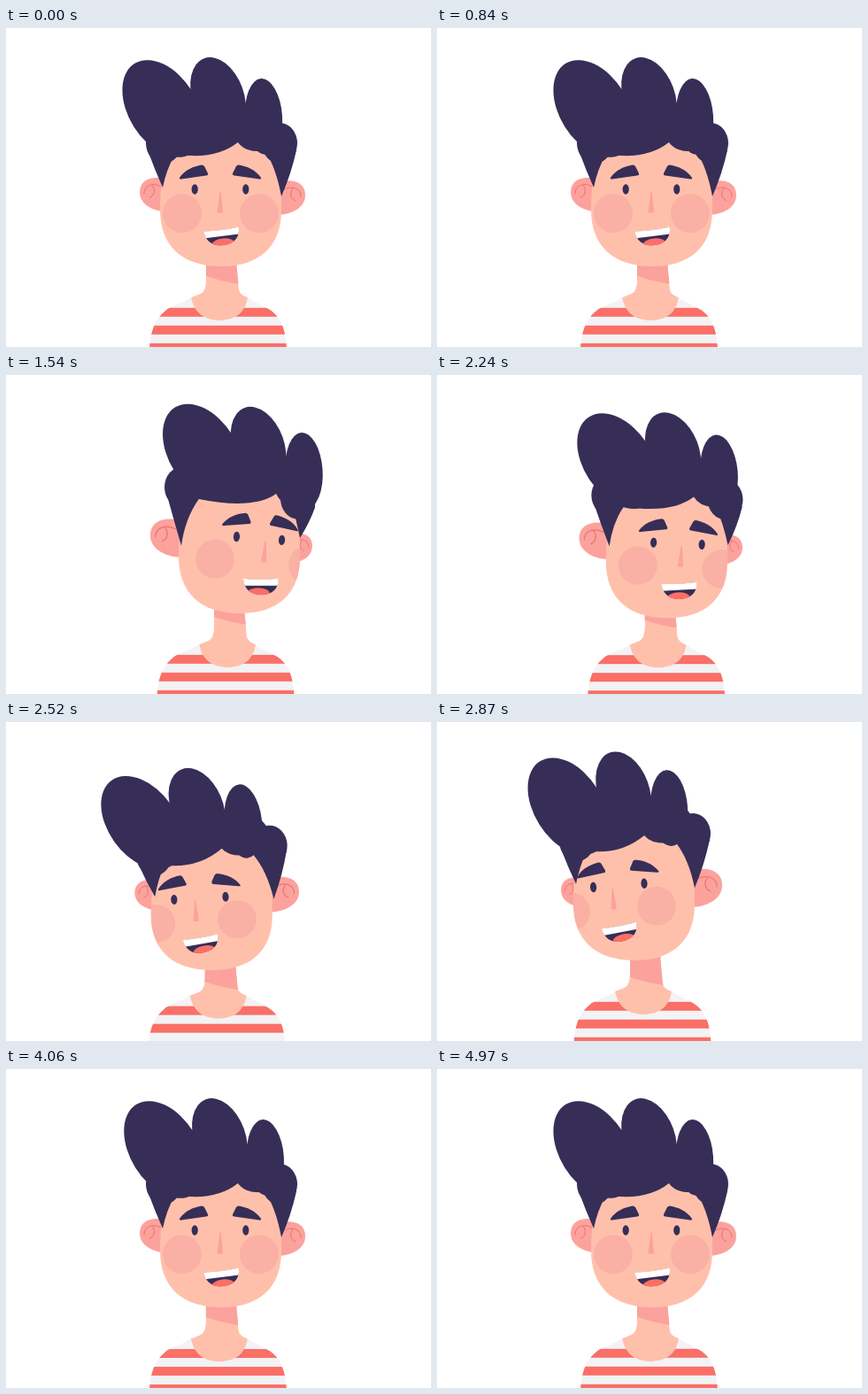
An HTML page with a canvas that plays this animation: 480x360 px, repeating every 5.04 s.

```html
<!DOCTYPE html>
<html lang="en">
<head>
<meta charset="utf-8">
<title>Boy looking around</title>
<style>
  html, body { margin: 0; width: 100%; height: 100%; overflow: hidden; background: #fff; }
  canvas { display: block; width: 480px; height: 360px; }
</style>
</head>
<body>
<canvas id="stage" width="480" height="360"></canvas>
<script>
const ctx = document.getElementById('stage').getContext('2d');
const LOOP = 5040;
const SKIN = '#ffc0ab', PINK = '#fca29d', BLUSH = '#fab0a5', INK = '#362e57',
      RED = '#fa6f67', SHIRT = '#f3f2f4', LINE = '#e8706f';

// Each turn: start, duration, pose before and after (1 right, -1 left), dip strength
const TURNS = [
  { start: 840, dur: 500, from: 0, to: 1, dip: 0.7 },
  { start: 2040, dur: 600, from: 1, to: -1, dip: 1 },
  { start: 3480, dur: 500, from: -1, to: 0, dip: 0.7 }
];
const LAG = { features: 0.04, head: 0.133, body: 0.25 };
const SIDES = [-1, 1];

const clamp = v => Math.max(0, Math.min(1, v));
const ease = u => (1 - Math.cos(Math.PI * u)) / 2;
// Smooth offset: 0 when facing front, reaching the given right and left values
const shift = (k, right, left) => k * (right - left) / 2 + k * k * (right + left) / 2;
const headX = k => shift(k, 21, -20);

function pose(time, lag) {
  let turn = 0, dip = 0, lean = 0;
  for (const s of TURNS) {
    const u = clamp((time - s.start) / s.dur - lag);
    const bump = Math.sin(Math.PI * u) ** 2 * s.dip;
    if (u > 0) turn = s.from + (s.to - s.from) * ease(u);
    dip += bump;
    lean += bump * Math.sign(s.to - s.from);
  }
  return { turn, dip, lean };
}

// Hair swings past its goal and settles
function swing(time) {
  let x = 0;
  for (const s of TURNS) {
    const after = Math.max(0, time - s.start - s.dur) / 200;
    const reach = 3 * Math.sign(s.to - s.from) * ease(clamp((time - s.start) / s.dur));
    x += reach * Math.exp(-after) * Math.cos(after);
  }
  return x;
}

function fill(color, path) {
  ctx.fillStyle = color;
  ctx.fill(typeof path === 'string' ? new Path2D(path) : path);
}

function oval(color, x, y, rx, ry = rx, angle = 0) {
  ctx.fillStyle = color;
  ctx.beginPath();
  ctx.ellipse(x, y, rx, ry, angle * Math.PI / 180, 0, Math.PI * 2);
  ctx.fill();
}

function group(draw) {
  ctx.save();
  draw();
  ctx.restore();
}

function drawShirt(body) {
  group(() => {
    ctx.translate(shift(body.turn, 8.5, -7.5), 5 * body.dip);
    ctx.clip(new Path2D('M209 304 C200 311 186 313 179 320 C167 330 163 345 162 362 V375 H317 V362 C316 345 313 331 302 321 C294 314 282 311 273 304 Z'));
    ctx.fillStyle = SHIRT;
    ctx.fillRect(150, 300, 180, 80);
    ctx.fillStyle = RED;
    for (let y = 315.8; y < 370; y += 20) ctx.fillRect(150, y, 180, 10);
  });
}

function drawNeck(body, head) {
  const neck = new Path2D('M226 235 V270 C226 285 227 297 219 300 L209 304 C212 321 224 330 241 330 C259 330 271 321 273 304 Q264 301 263 295 L260.500 268 V235 Z');
  group(() => {
    ctx.translate(shift(body.turn, 9, -8), 5 * body.dip);
    ctx.clip(neck);
    fill(SKIN, neck);
    ctx.translate(0, shift(head.turn, -7, 8) + 6 * head.dip);
    fill(PINK, 'M215 220 L224 279 Q242 286 264 289 L275 220 Z');
  });
}

function drawEars(head) {
  const k = head.turn;
  for (const side of SIDES) group(() => {
    ctx.translate(244.5 + side * 75.5 + shift(k, 13 - 2 * side, -16.5 - 2.5 * side),
                  190 + side * (1.7 + 4 * k) - 11 * head.dip);
    ctx.scale(side * (1 - side * k * 0.17), 1 - side * k * 0.13);
    fill(PINK, 'M-18 -14 C-8 -22 18 -23 18 -3 C18 11 3 19 -14 19 Z');
    ctx.strokeStyle = LINE;
    ctx.stroke(new Path2D('M13 -1 C13 -12 2 -14 -7 -9 M4 -11 C0 -6 1 1 7 3'));
  });
}

function drawFace(head, k) {
  const face = new Path2D('M174 205 C174 190 175 178 177 165 L190 125 H300 L310 165 C311 180 311 190 311 205 C311 247 286 269 243 269 C199 269 174 246 174 205 Z');
  group(() => {
    ctx.translate(headX(head.turn), 0);
    fill(SKIN, face);
    ctx.clip(face);
    ctx.translate(-headX(k), 3 * head.dip);
    for (const side of SIDES) {
      oval(BLUSH, 242.5 + 43.5 * side + shift(k, 46 + 9 * side, -43 + 5 * side),
           209.2 + 1.7 * k * k + 3.3 * side * k, 22);
    }
  });
}

// Hair near the top and middle slides further than the rim; sideburns tilt the other way
function warp(k, x, y) {
  const near = Math.max(0, 1 - ((x - 245) / 62) ** 2, clamp((120 - y) / 18));
  const drop = clamp((y - 150) / 29);
  const tilt = (1 - drop) * shift(k, 0.1, -0.062) + drop * shift(k, -0.14, -0.04);
  return [x + headX(k) + near * shift(k, 24, -8.5),
          y + shift(k, 3.3, 0) + (x - 245) * tilt];
}

function drawHair(head, k, time) {
  const at = (x, y) => warp(k, x, y);
  const lock = (x, y, rx, ry, angle) => oval(INK, ...at(x, y), rx, ry, angle);
  group(() => {
    ctx.translate(headX(head.turn) - headX(k) + 240, 150);
    ctx.rotate(0.06 * head.lean);
    ctx.translate(-240, -150);

    group(() => {
      ctx.translate(swing(time), 0);
      lock(177, 91, 60, 38.5, 58);
      lock(239.5, 77, 45.5, 29, 70);
      lock(291, 100, 43, 21, 86);
    });
    for (const side of SIDES) lock(243.5 + side * 65.5, 130, 20, 23, 0);

    const cap = new Path2D();
    const curve = (cx, cy, x, y) => cap.quadraticCurveTo(...at(cx, cy), ...at(x, y));
    cap.moveTo(...at(160, 138));
    curve(168, 160, 177, 180);
    curve(181, 160, 191, 142);
    curve(235, 150, 262, 129);
    curve(270, 141, 293, 139);
    curve(305, 158, 311, 190);
    curve(322, 165, 328, 138);
    cap.lineTo(...at(300, 88));
    cap.lineTo(...at(190, 76));
    cap.closePath();
    fill(INK, cap);
  });
}

function drawMouth(k) {
  group(() => {
    ctx.translate(243 + 4.2 * k, 227);
    ctx.rotate(-0.125 + shift(k, 0.05, 0.015));
    const mouth = new Path2D('M-20 0 Q0 2 20 0 C20 12 13 18.500 0 18.500 C-13 18 -19 11 -20 0 Z');
    ctx.clip(mouth);
    fill(INK, mouth);
    oval(RED, -3 * k, 17, 13, 6.5);
    fill('#fff', 'M-22 -2 H22 V8 H-22 Z');
  });
}

function drawFeatures(head, k) {
  group(() => {
    ctx.translate(headX(head.turn) - headX(k) + shift(k, 44, -36.7) + 242,
                  182 + 2.4 * k * k + 3 * head.dip);
    ctx.rotate(0.075 * k);
    ctx.translate(-242, -182);
    for (const side of SIDES) group(() => {
      ctx.translate(242 - side * shift(k, 3.2, 0), 0);
      ctx.scale(side, 1);
      oval(INK, 28.8, 182, 3.6, 5.7);
      fill(INK, 'M46 169 C40 160 30 156 21 154.500 Q19 154.500 18 156 L14 164 Q13.500 166.500 16 166.500 L44 170.500 Q47 171 46 169 Z');
    });
    group(() => {
      ctx.translate(7.3 * k, 0);
      fill(PINK, 'M241.500 184 Q243 184 243 188 L245 208 Q242 209.500 238.500 208 Z');
    });
    drawMouth(k);
  });
}

function render(time) {
  const head = pose(time, LAG.head);
  const body = pose(time, LAG.body);
  const k = pose(time, LAG.features).turn;
  ctx.fillStyle = '#fff';
  ctx.fillRect(0, 0, 480, 360);
  drawShirt(body);
  drawNeck(body, head);
  group(() => {
    ctx.translate(0, 269 + 15 * head.dip);
    ctx.scale(1, 1 - 0.035 * head.dip);
    ctx.translate(0, -269);
    drawEars(head);
    drawFace(head, k);
    drawHair(head, k, time);
    drawFeatures(head, k);
  });
}

const begin = performance.now();
function tick() {
  render((performance.now() - begin) % LOOP);
  requestAnimationFrame(tick);
}
tick();
</script>
</body>
</html>
```
